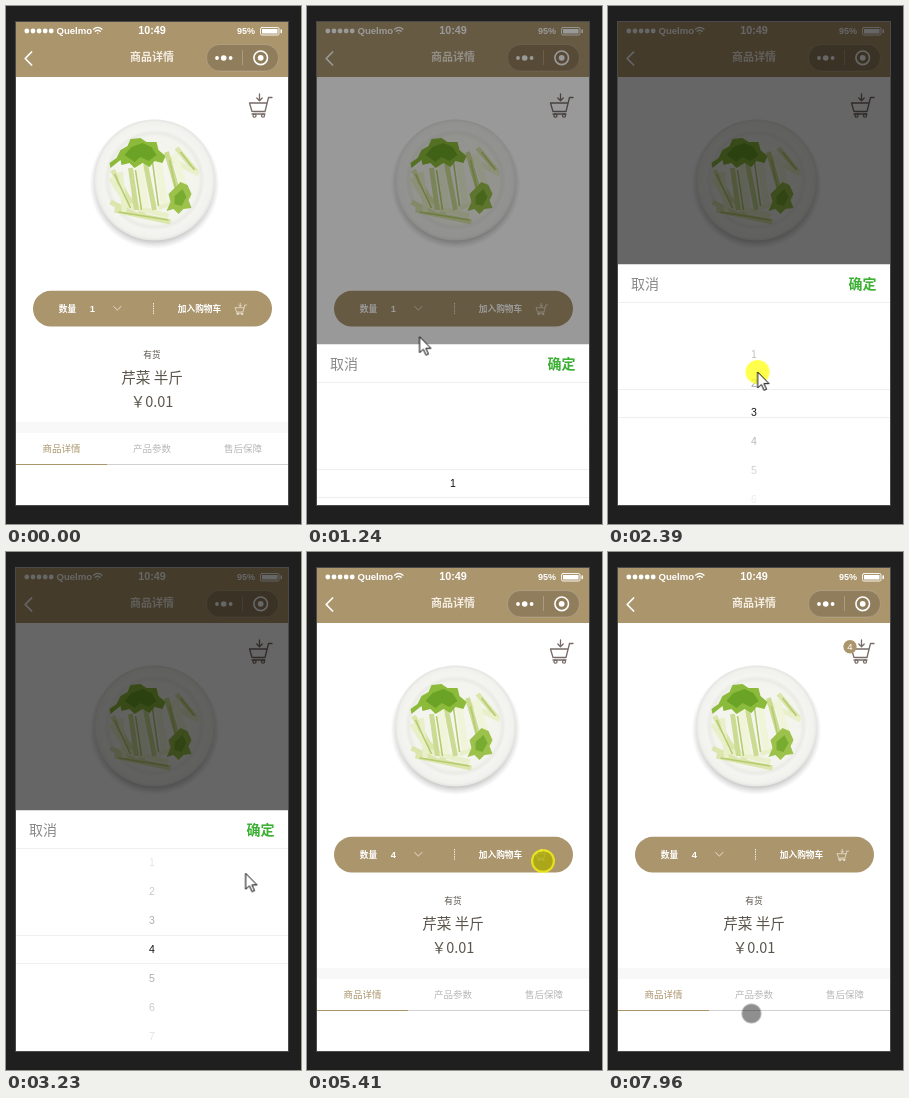
Write an HTML page that moves like this. It is 295 px wide and 518 px high and loops after 8 s.

```html
<!DOCTYPE html>
<html lang="zh">
<head>
<meta charset="utf-8">
<title>商品详情</title>
<style>
html, body { margin: 0; width: 100%; height: 100%; overflow: hidden; background: #1f1f1f; }
svg { display: block; width: 100vw; height: 100vh; }
text { font-family: "Noto Sans CJK SC", "Noto Sans CJK", "Noto Sans", sans-serif; text-anchor: middle; }
.lat { font-family: "Liberation Sans", Arial, sans-serif; }
.tan { fill: #ab956d; }
.white { fill: #fff; }
.bold { font-weight: bold; }
.small { font-size: 8.7px; }
.tab { font-size: 9.5px; fill: #b8b8b8; }
.num { font-size: 10.5px; fill: #111; }
.line { fill: none; stroke-linecap: round; stroke-linejoin: round; }

.anim { animation: 8s linear infinite; }
.step { animation: 8s step-end infinite; }
.dim { animation-name: dim; }
.panel { animation-name: panel; }
.wheel { animation-name: wheel; }
.cursor { animation-name: move; }
.dot { animation-name: dot; }
.arrow { animation-name: arrow; }
.ring { animation-name: ring; }
.one { animation-name: one; }
.four { animation-name: four; }
.fly { animation-name: fly; }
.badge { animation-name: badge; }
.cart { animation-name: shake; transform-origin: 254.5px 99px; }

@keyframes dim {
  0%, 14.05% { opacity: 0; animation-timing-function: ease; }
  17.8%, 44% { opacity: .6; animation-timing-function: ease; }
  47.75%, 100% { opacity: 0; }
}
@keyframes panel {
  0%, 14.05% { transform: translateY(241px); animation-timing-function: ease; }
  17.8%, 44% { transform: translateY(0); animation-timing-function: ease; }
  47.75%, 100% { transform: translateY(241px); }
}
@keyframes wheel {
  0%, 24.125% { transform: translateY(0); }
  33.75% { transform: translateY(-82px); animation-timing-function: ease-out; }
  36.625%, 100% { transform: translateY(-87px); }
}
@keyframes move {
  0%, 2.875% { transform: translate(216px, 458px); }
  7.5% { transform: translate(158px, 374px); }
  10.625%, 12.25% { transform: translate(107px, 304px); }
  13.375% { transform: translate(112.5px, 329px); }
  15.5% { transform: translate(112.5px, 330.5px); }
  21.25% { transform: translate(125.5px, 399.5px); }
  23.125% { transform: translate(139px, 413px); }
  24.125% { transform: translate(143px, 418px); }
  33.75% { transform: translate(154px, 331px); }
  36.625%, 38.5% { transform: translate(174px, 330px); }
  40.375% { transform: translate(239.5px, 321.5px); }
  42.875%, 44% { transform: translate(256px, 280px); }
  48.125%, 52.125% { transform: translate(262px, 285px); animation-timing-function: ease-in-out; }
  58.875%, 93.75% { transform: translate(236px, 309px); }
  98.125% { transform: translate(139px, 479px); }
  99.5%, 100% { transform: translate(143.5px, 461.5px); }
}
@keyframes dot {
  0% { opacity: 0; }
  2.875% { opacity: .44; }
  10.625% { opacity: .25; }
  12.25% { opacity: .44; }
  14% { opacity: 0; }
  47.5% { opacity: .44; }
  67.4% { opacity: .25; }
  68.5%, 100% { opacity: .44; }
}
@keyframes arrow {
  0% { opacity: 0; }
  14% { opacity: 1; }
  47.5%, 100% { opacity: 0; }
}
@keyframes ring {
  0% { opacity: 0; }
  10.625% { opacity: 1; }
  12.25% { opacity: 0; }
  24.125% { opacity: 1; }
  33.75% { opacity: 0; }
  43% { opacity: 1; }
  44% { opacity: 0; }
  67.4% { opacity: 1; }
  68.5%, 100% { opacity: 0; }
}
@keyframes one { 0% { opacity: 1; } 44%, 100% { opacity: 0; } }
@keyframes four { 0% { opacity: 0; } 44%, 100% { opacity: 1; } }
@keyframes fly {
  0%, 67.875% {
    opacity: 0;
    transform: translate(238px, 304px) rotate(0deg) scale(.23);
    animation-timing-function: cubic-bezier(.175, .885, .32, 1);
  }
  80.25%, 100% { opacity: 1; transform: translate(257.5px, 73px) rotate(150deg) scale(0); }
}
@keyframes badge { 0% { opacity: 0; } 82%, 100% { opacity: 1; } }
@keyframes shake {
  0%, 81.99% { transform: scale(1); }
  82% { transform: scale(1.1); }
  84.5%, 100% { transform: scale(1); }
}
</style>
</head>
<body>
<svg viewBox="0 0 295 518">
  <defs>
    <clipPath id="screen"><rect x="10" y="16" width="272" height="483"/></clipPath>
    <filter id="soft"><feGaussianBlur stdDeviation=".7"/></filter>
    <radialGradient id="rim">
      <stop offset="0" stop-color="#f6f6f1"/>
      <stop offset=".72" stop-color="#f4f4ef"/>
      <stop offset=".78" stop-color="#ebebe6"/>
      <stop offset=".84" stop-color="#f4f4f1"/>
      <stop offset=".95" stop-color="#f1f1ee"/>
      <stop offset="1" stop-color="#e4e4e1"/>
    </radialGradient>
    <radialGradient id="shade">
      <stop offset=".86" stop-color="#999" stop-opacity=".6"/>
      <stop offset="1" stop-color="#bbb" stop-opacity="0"/>
    </radialGradient>
    <linearGradient id="fade" x2="0" y2="1">
      <stop offset="0" stop-color="#fff" stop-opacity=".95"/>
      <stop offset="1" stop-color="#fff" stop-opacity=".6"/>
    </linearGradient>
    <g id="dish">
      <circle cy="4" r="65" fill="url(#shade)"/>
      <circle r="60.5" fill="url(#rim)"/>
      <g filter="url(#soft)">
        <g class="line" stroke-width="5" style="stroke-linecap:butt">
          <path stroke="#dbe5ac" d="M-40 4L-10 34M-42 -10L-22 26M-40 30L16 42M22 -32L42 -8M-44 22L-20 34"/>
          <path stroke="#e9efc8" d="M-34 -8L-30 32M10 -24L44 -6M-32 24L14 36M4 28L36 16M-44 -2L-30 20"/>
          <path stroke="#cbdc92" d="M-24 -12L-18 30M12 -28L24 14M-9 -16L0 30"/>
          <path stroke="#f0f4d8" stroke-width="7" d="M-15 -16L-9 28M3 -24L10 24M20 -26L30 8"/>
          <path stroke="#b4cc6c" stroke-width="1.6" d="M-19 -10L-13 30M-2 -18L4 26M15 -20L22 12M-40 -6L-24 28M-36 32L14 40M26 -28L40 -10"/>
        </g>
        <path fill="#8cba3a" d="M-38 -22L-34 -30L-27 -34L-24 -41L-14 -42L-8 -38L2 -38L4 -30L11 -24L8 -17L0 -19L-5 -13L-12 -17L-20 -12L-25 -17L-33 -15L-34 -20L-44 -12L-45 -17Z"/>
        <path fill="#6ba326" d="M-30 -25L-23 -33L-12 -37L-3 -33L2 -25L-6 -19L-14 -23L-20 -18Z"/>
        <path fill="#9cc24c" d="M14 14L20 8L26 2L33 5L37 14L34 20L37 28L29 29L24 34L19 29L12 31L16 22Z"/>
        <path fill="#78ac30" d="M20 16L28 9L32 17L27 26L20 24Z"/>
      </g>
    </g>
    <g id="basket" class="line">
      <path d="M23 4H19.5L16 18H4M.5 9.5H18M.5 9.5L3 18M3 20.5H16"/>
      <circle cx="5.5" cy="22.2" r="1.5"/><circle cx="14" cy="22.2" r="1.5"/>
      <path d="M10.5 .5V7M7.8 4.5L10.5 7.2L13.2 4.5"/>
    </g>
  </defs>

  <rect x="9" y="15" width="274" height="485" fill="#4a4a4a"/>
  <g clip-path="url(#screen)">
    <rect class="white" x="10" y="16" width="272" height="483"/>
    <rect class="tan" x="10" y="16" width="272" height="55"/>

    <g class="white lat">
      <circle cx="20.8" cy="25" r="2.4"/><circle cx="27" cy="25" r="2.4"/><circle cx="33.1" cy="25" r="2.4"/>
      <circle cx="39.2" cy="25" r="2.4"/><circle cx="45.2" cy="25" r="2.4"/>
      <text class="lat bold" x="68.3" y="28.2" font-size="9.6">Quelmo</text>
      <text class="lat bold" x="146" y="28.2" font-size="10.8">10:49</text>
      <text class="lat bold" x="240" y="28" font-size="9">95%</text>
    </g>
    <g class="line" stroke="#fff">
      <path stroke-width="1.3" d="M87.5 23.2Q91.7 19.6 96 23.2M89.2 25.3Q91.7 23.2 94.3 25.3"/>
      <circle cx="91.7" cy="27.2" r=".7" fill="#fff" stroke="none"/>
      <rect x="254.5" y="21.5" width="18.5" height="7.5" rx="1.5" stroke-width=".9"/>
      <rect x="256" y="23" width="15.5" height="4.5" fill="#fff" stroke="none"/>
      <path stroke-width="1.5" d="M275.2 24V26.5"/>
      <path stroke-width="1.7" d="M25.6 46L19.2 52.5L25.6 59"/>
    </g>
    <text class="bold" x="146" y="55.4" font-size="11" fill="#f3ede2">商品详情</text>
    <rect x="200.5" y="38.5" width="72" height="26.5" rx="13.2" fill="#000" fill-opacity=".16" stroke="#fff" stroke-opacity=".25" stroke-width=".7"/>
    <path d="M236.5 44V59" stroke="#fff" stroke-opacity=".3" stroke-width=".8"/>
    <g class="white">
      <circle cx="211" cy="52" r="1.9"/><circle cx="217.7" cy="52" r="2.8"/><circle cx="224.6" cy="52" r="1.9"/>
      <circle cx="254.7" cy="51.8" r="2.9"/>
    </g>
    <circle cx="254.7" cy="51.8" r="6.8" fill="none" stroke="#fff" stroke-width="1.6"/>

    <use href="#dish" x="148.5" y="174"/>

    <g class="anim cart">
      <use href="#basket" x="243" y="87.5" stroke="#776c68" stroke-width="1.3"/>
      <g class="step badge">
        <circle class="tan" cx="242" cy="94.7" r="6.7"/>
        <text class="lat white" x="242" y="98" font-size="9.5">4</text>
      </g>
    </g>

    <rect class="tan" x="27" y="284.8" width="239" height="35.7" rx="17.8"/>
    <g class="white small bold">
      <text x="61.5" y="306">数量</text>
      <text class="lat step one" x="86.3" y="306" font-size="9.3">1</text>
      <text class="lat step four" x="86.3" y="306" font-size="9.3">4</text>
      <text x="193.5" y="306">加入购物车</text>
    </g>
    <path class="line" d="M107.7 300.5L111.3 304L115 300.5" stroke="#e9dfcb" stroke-width="1"/>
    <path d="M147.5 297V308" stroke="#f4eee2" stroke-width="1" stroke-dasharray="1.4 1"/>
    <use href="#basket" transform="translate(229 297) scale(.5)" stroke="#efe6d6" stroke-width="1.5"/>

    <g fill="#5a544a">
      <text class="small" x="146" y="352.3">有货</text>
      <text x="146" y="376.6" font-size="14.6">芹菜 半斤</text>
      <text x="146" y="401.3" font-size="14.5">￥0.01</text>
    </g>

    <rect x="10" y="416" width="272" height="11" fill="#f8f8f8"/>
    <text class="tab" x="55.5" y="446" style="fill:#ab956d">商品详情</text>
    <text class="tab" x="146" y="446">产品参数</text>
    <text class="tab" x="237" y="446">售后保障</text>
    <rect x="101" y="458" width="181" height="1" fill="#d0d0d0"/>
    <rect class="tan" x="10" y="458" width="91" height="1"/>

    <g class="anim fly"><use href="#dish"/></g>

    <rect class="anim dim" x="10" y="16" width="272" height="483"/>

    <g class="anim panel">
      <rect class="white" x="10" y="258.5" width="272" height="242"/>
      <g class="anim wheel">
        <text class="num lat" x="146" y="401.3">1</text>
        <text class="num lat" x="146" y="430.3">2</text>
        <text class="num lat" x="146" y="459.3">3</text>
        <text class="num lat" x="146" y="488.3">4</text>
        <text class="num lat" x="146" y="517.3">5</text>
        <text class="num lat" x="146" y="546.3">6</text>
        <text class="num lat" x="146" y="575.3">7</text>
        <text class="num lat" x="146" y="604.3">8</text>
      </g>
      <rect x="10" y="296" width="272" height="87" fill="url(#fade)"/>
      <rect x="10" y="296" width="272" height="87" fill="url(#fade)" transform="matrix(1 0 0 -1 0 795)"/>
      <rect class="white" x="10" y="258.5" width="272" height="37.5"/>
      <path d="M10 296.5H282M10 383.5H282M10 411.5H282" stroke="#efefef" stroke-width="1"/>
      <text x="37" y="282.8" font-size="14" fill="#888">取消</text>
      <text class="bold" x="254.5" y="282.8" font-size="14" fill="#3cb033">确定</text>
    </g>
  </g>

  <g class="anim cursor">
    <circle class="step ring" r="12" fill="#ff0" fill-opacity=".7"/>
    <circle class="step dot" r="9.8"/>
    <path class="step arrow" d="M0 0V16L3.8 12.6L6.4 18.4L8.9 17.3L6.3 11.7H11.4Z" fill="#fff" stroke="#000" stroke-width="1"/>
  </g>
</svg>
</body>
</html>
```
